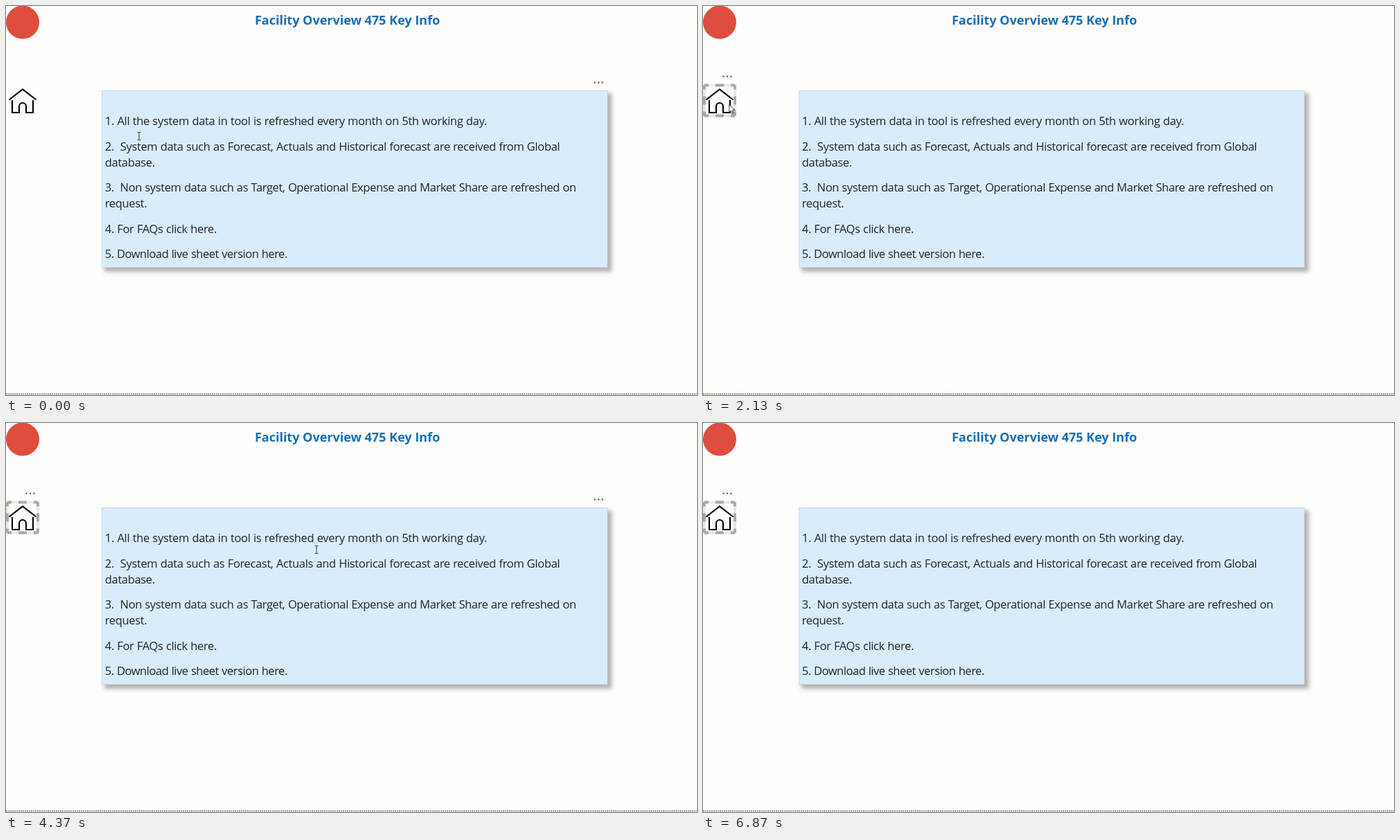
These frames come from a looping animation (997 by 562 pixels, 6900 ms). An HTML page:

```html
<!DOCTYPE html>
<html lang="en">
<head>
<meta charset="utf-8">
<title>Key Info</title>
<style>
  html, body { margin: 0; width: 100%; height: 100%; overflow: hidden; background: #fdfdfc; }
  svg { position: absolute; left: 0; top: 0; }
  text { font-family: "Open Sans", "Noto Sans", sans-serif; }

  .panel, .rule { position: absolute; box-sizing: border-box; }
  .panel {
    left: 138px; top: 122px; width: 730px; height: 256px;
    background: #d9ecfc; border: 1px solid #cbd8e2;
    box-shadow: 5px 5px 6px 1px rgba(0, 0, 0, .3);
  }
  .rule {
    left: 0; top: 560px; width: 997px; height: 1px;
    background: repeating-linear-gradient(90deg, #444 0 2px, transparent 2px 3px);
  }

  .title { font-size: 18.1px; font-weight: 700; fill: #176eb5; text-anchor: middle; letter-spacing: -.05px; }
  .copy { font-size: 16.5px; fill: #252423; word-spacing: .45px; letter-spacing: -.345px; }
  .hint { font-size: 11.5px; fill: #111; text-anchor: end; letter-spacing: -.2px; }
  .dots { fill: #605e5c; }
  .line { fill: none; stroke: #000; stroke-width: 2.1; }
  .bubble { fill: #fff; filter: drop-shadow(4px 6px 6px rgba(0, 0, 0, .16)); }
  .pointer { fill: #fff; stroke: #111; stroke-width: 1; stroke-linejoin: round; }

  /* Visibility switches hard; only the pointer travels. */
  .reading, .arrow, .hover, .tip, .menu, .picked { animation: 6.9s step-end infinite; }
  .reading { animation-name: reading; }
  .arrow { animation-name: arrow; }
  .hover { animation-name: hover; }
  .tip { animation-name: tip; }
  .menu { animation-name: menu; }
  .picked { animation-name: picked; }
  .cursor { animation: travel 6.9s linear infinite; }

  @keyframes reading {
    0%, 46.4% { visibility: visible; }
    6.7%, 69.5%, 100% { visibility: hidden; }
  }
  @keyframes arrow {
    0%, 11.2%, 46.4%, 78%, 100% { visibility: hidden; }
    6.7%, 24.64%, 69.5% { visibility: visible; }
  }
  @keyframes hover {
    0%, 24.64%, 100% { visibility: hidden; }
    11.2% { visibility: visible; }
  }
  @keyframes tip {
    0%, 24.64%, 100% { visibility: hidden; }
    14% { visibility: visible; }
  }
  @keyframes menu {
    0% { visibility: hidden; }
    11.2%, 100% { visibility: visible; }
  }
  @keyframes picked {
    0% { visibility: hidden; }
    24.64%, 100% { visibility: visible; }
  }
  @keyframes travel {
    0% { transform: translate(192px, 188px); }
    2.5% { transform: translate(192px, 188px); animation-timing-function: ease-in-out; }
    13%, 37.7% { transform: translate(37.5px, 141.5px); }
    37.7% { animation-timing-function: ease-in; }
    45.36% { transform: translate(181px, 168px); animation-timing-function: ease-out; }
    63.33%, 66% { transform: translate(448px, 183px); }
    66% { animation-timing-function: ease-in-out; }
    72.9% { transform: translate(426px, 69px); }
    77%, 100% { transform: translate(418px, -20px); }
  }
</style>
</head>
<body>
<div class="panel"></div>
<div class="rule"></div>
<svg width="997" height="562" viewBox="0 0 997 562">
  <defs>
    <g id="dots"><circle cx="-5.5" r="1.2"/><circle r="1.2"/><circle cx="5.5" r="1.2"/></g>
  </defs>

  <circle cx="24" cy="23.5" r="24" fill="#de4d3e"/>
  <text class="title" x="492.5" y="26.5">Facility Overview 475 Key Info</text>

  <g class="copy">
    <text x="142.8" y="172" style="letter-spacing:-.315px">1. All the system data in tool is refreshed every month on 5th working day.</text>
    <text x="142.8" y="209">2.&#160; System data such as Forecast, Actuals and Historical forecast are received from Global</text>
    <text x="142.8" y="231.5">database.</text>
    <text x="142.8" y="268" style="letter-spacing:-.38px">3.&#160; Non system data such as Target, Operational Expense and Market Share are refreshed on</text>
    <text x="142.8" y="291">request.</text>
    <text x="142.8" y="327.5">4. For FAQs click here.</text>
    <text x="142.8" y="364" style="letter-spacing:-.46px">5. Download live sheet version here.</text>
  </g>

  <use class="dots reading" href="#dots" x="855" y="110.5"/>
  <use class="dots menu" href="#dots" x="35" y="101.8"/>

  <!-- Home button -->
  <rect class="hover" x=".5" y="113.5" width="46" height="46" fill="#fff" stroke="#e6e6e6"/>
  <g class="picked" fill="none">
    <rect x="2" y="114.5" width="44" height="44" stroke="#e9e9e9" stroke-width="4"/>
    <rect x="2" y="114.5" width="44" height="44" stroke="#a8a8a8" stroke-width="4" stroke-dasharray="6 10 12 10 6 0"/>
  </g>
  <path class="line" d="M4.5 135.5 24 120.3 43.5 135.5"/>
  <path class="line" d="M9 136V154H19V145a5 5 0 0 1 10 0V154H39V136"/>

  <g class="tip">
    <path class="bubble" d="M-40 69H104q2 0 2 2V98q0 2-2 2H34L24 110 14 100H-40Z"/>
    <text class="hint" x="99.3" y="89">Click here to follow link</text>
  </g>

  <g class="cursor">
    <path class="reading" d="M-2.5-5.5H-.6L0-5 .6-5.5H2.5M0-5V5M-2.5 5.5H-.6L0 5 .6 5.5H2.5" fill="none" stroke="#3a332c"/>
    <path class="pointer arrow" d="M0 .5V12.5L2.9 9.8 4.8 14 6.7 13.2 4.9 9.1H8.8Z"/>
    <path class="pointer hover" d="M-1.5 0Q0-2 1.2 0V5.5Q3 4.6 3.6 6.2 5.2 5.4 5.8 7 7.6 6.6 7.6 8.5V12Q7.4 14.5 6 17.3H-.2Q-2-14 -2 14L-4.8 10.2Q-5 8.2-3 8.8L-1.5 10.4Z" transform="translate(0 0)"/>
  </g>
</svg>
</body>
</html>
```
